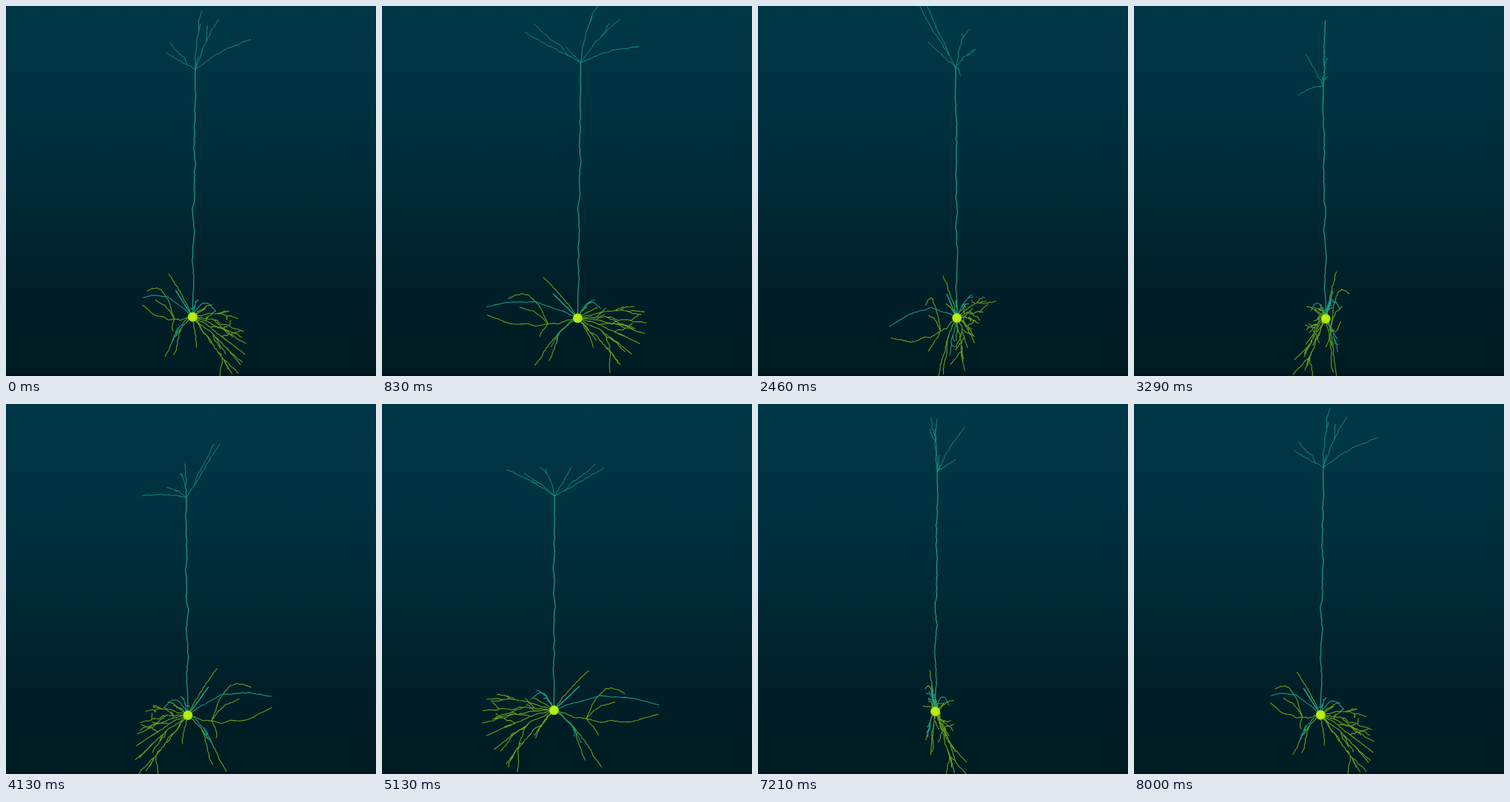
Write an HTML page with a canvas that moves like this. It is 500x500 px and loops after 8040 ms.

```html
<!DOCTYPE html>
<html lang="en">
<head>
<meta charset="utf-8">
<title>Rotating neuron</title>
<style>
  html, body { margin: 0; width: 100%; height: 100%; overflow: hidden; background: #001a20; }
  canvas { display: block; width: 500px; height: 500px; }
</style>
</head>
<body>
<canvas id="stage" width="500" height="500"></canvas>
<script>
const ctx = document.getElementById('stage').getContext('2d');
const LOOP = 8040, STEP = 1000 / 24, LAST = 192;
const DIST = 565, MID = 250, RAD = Math.PI / 180;
const cosDeg = a => Math.cos(a * RAD), sinDeg = a => Math.sin(a * RAD);

let seed = 41;
const rand = () => (seed = (seed * 16807) % 2147483647) / 2147483647;
const spread = size => (rand() - 0.5) * 2 * size;

// Points are [x, z, height] relative to the cell body.
const soma = [0, 0, 0], crown = [4, 2, 360];

// A wandering path between two points; lift bows it upwards.
function grow(from, to, lift = 0, rough = 0.9) {
  const length = Math.hypot(...to.map((v, i) => v - from[i]));
  const n = Math.max(3, Math.round(length / 3));
  const drift = [0, 0, 0], path = [];
  for (let j = 0; j <= n; j++) {
    const u = j / n, loose = Math.min(1, 5 * u, 5 * (1 - u));
    path.push(from.map((v, i) => {
      drift[i] = drift[i] * 0.84 + spread(rough);
      const bow = i === 2 ? lift * Math.sin(Math.PI * u) : 0;
      return v + (to[i] - v) * u + bow + drift[i] * loose;
    }));
  }
  return path;
}

const along = (path, u) => path[Math.round(u * (path.length - 1))];

// Short side shoots that lean along their parent.
function shoots(path, count, size) {
  return Array.from({ length: count }, () => {
    const u = 0.25 + 0.55 * rand();
    const a = along(path, u), b = along(path, u + 0.2);
    const gap = Math.hypot(...b.map((v, i) => v - a[i])) || 1;
    const tip = a.map((v, i) => v + (b[i] - v) / gap * size * 0.8 + spread(size * 0.7));
    return grow(a, tip, 0, 1);
  });
}

const trunk = [grow(soma, crown, 0, 0.75)];

// Tuft at the top of the trunk
const east = grow(crown, [80, 42, 388], 4);
const south = grow(crown, [36, 47, 414], 5);
const peak = grow(crown, [13, 31, 434], 16);
const west = grow(crown, [-44, -70, 415]);
const tuft = [
  east, south, peak, west,
  grow(along(west, 0.2), [-36, -58, 425], 2),
  grow(crown, [10, -40, 396]),
  ...shoots(south, 1, 16), ...shoots(peak, 1, 14)
];

// Teal branches around the cell body
const plume = grow(soma, [-84, -112, 6], 16);
const drop = grow(soma, [-30, -22, -40], 9);
const curl = grow(soma, [8, 26, 29], 6);
const teal = [
  plume, drop, curl,
  grow(soma, [32, 12, 11], 15),
  ...shoots(curl, 3, 11), ...shoots(drop, 2, 9)
];
const stub = [grow(soma, [-25, -24, 33], 0, 0.1)];

// Green branches on the sparse side
const limb = grow(soma, [-84, -110, -6], -12);
const root = grow(soma, [-42, -45, -70], 7);
const fork = along(limb, 0.3);
const sparse = [
  limb, root,
  grow(soma, [-36, -33, 56], 4),
  grow(fork, [-72, -68, 25], 20),
  grow(fork, [-58, -60, 12], 5),
  grow(fork, [-30, -50, -33]),
  grow(along(root, 0.4), [-28, -30, -62])
];

// Dense side: a fan that sinks and shortens as it turns
const dense = [];
for (let i = 0; i < 6; i++) {
  const t = i / 5, turn = 38 + 22 * t, reach = 92 + 24 * t - 55 * t * t;
  const tip = [reach * sinDeg(turn), reach * cosDeg(turn), 15 - 83 * t];
  const branch = grow(soma, tip, 4, 1.1);
  dense.push(branch, ...shoots(branch, 3, 22));
}
for (let i = 0; i < 4; i++) {
  const turn = 10 + 30 * i;
  dense.push(grow(soma, [28 * sinDeg(turn), 28 * cosDeg(turn), i % 2 ? 16 : -34], 3, 1.1));
}

const parts = [
  { lines: sparse, color: '#64a01b', width: 1.1 },
  { lines: dense, color: '#64a01b', width: 1.1 },
  { lines: teal, color: '#0c9a8c', width: 1.1 },
  { lines: stub, color: '#12a7a0', width: 1.5 },
  { lines: tuft, color: '#0f917c', width: 1 },
  { lines: trunk, color: '#12a88a', width: 1.15 }
];

// The camera circles on a tilted ring, so pitch, size and centre sway with the turn.
function camera(deg) {
  const c = cosDeg(deg), s = sinDeg(deg), twice = cosDeg(2 * deg);
  const pitch = -13.8 + 13 * cosDeg(deg - 38);
  const ce = cosDeg(pitch), se = sinDeg(pitch);
  const zoom = 0.988 - 0.03 * cosDeg(deg + 8) - 0.012 * twice;
  const sx = 21 * sinDeg(deg + 6);
  const sy = 168.2 + 5.5 * cosDeg(deg - 95) + 2.5 * twice;
  return ([x, z, h]) => {
    const side = (x * c + z * s) * zoom, near = (z * c - x * s) * zoom, up = h * zoom;
    const k = DIST / (DIST - up * se - near * ce);
    return [MID + k * (sx + side), MID + k * (sy - up * ce + near * se)];
  };
}

const sky = ctx.createLinearGradient(0, 0, 0, 500);
['#003848', '#003241', '#002a37', '#001f28', '#001b22']
  .forEach((color, i) => sky.addColorStop(i / 4, color));

function drawSoma([x, y]) {
  const glow = ctx.createRadialGradient(x - 1, y - 1, 1, x, y, 6.6);
  glow.addColorStop(0, '#c0f014');
  glow.addColorStop(0.75, '#b2e912');
  glow.addColorStop(1, '#93c816');
  ctx.fillStyle = glow;
  ctx.beginPath();
  ctx.arc(x, y, 6.5, 0, Math.PI * 2);
  ctx.fill();
}

function draw(frame) {
  ctx.fillStyle = sky;
  ctx.fillRect(0, 0, 500, 500);
  ctx.fillStyle = '#00161c';
  ctx.fillRect(0, 496, 500, 4);
  const project = camera(frame / LAST * 360);
  ctx.lineJoin = ctx.lineCap = 'round';
  for (const { lines, color, width } of parts) {
    ctx.strokeStyle = color;
    ctx.lineWidth = width;
    ctx.beginPath();
    for (const line of lines) {
      line.forEach((p, i) => {
        const [x, y] = project(p);
        if (i) ctx.lineTo(x, y); else ctx.moveTo(x, y);
      });
    }
    ctx.stroke();
  }
  drawSoma(project(soma));
}

const start = performance.now();
function tick() {
  const t = Math.max(0, performance.now() - start) % LOOP;
  draw(Math.min(LAST, Math.floor((t + 5) / STEP)));
  requestAnimationFrame(tick);
}
tick();
</script>
</body>
</html>
```
